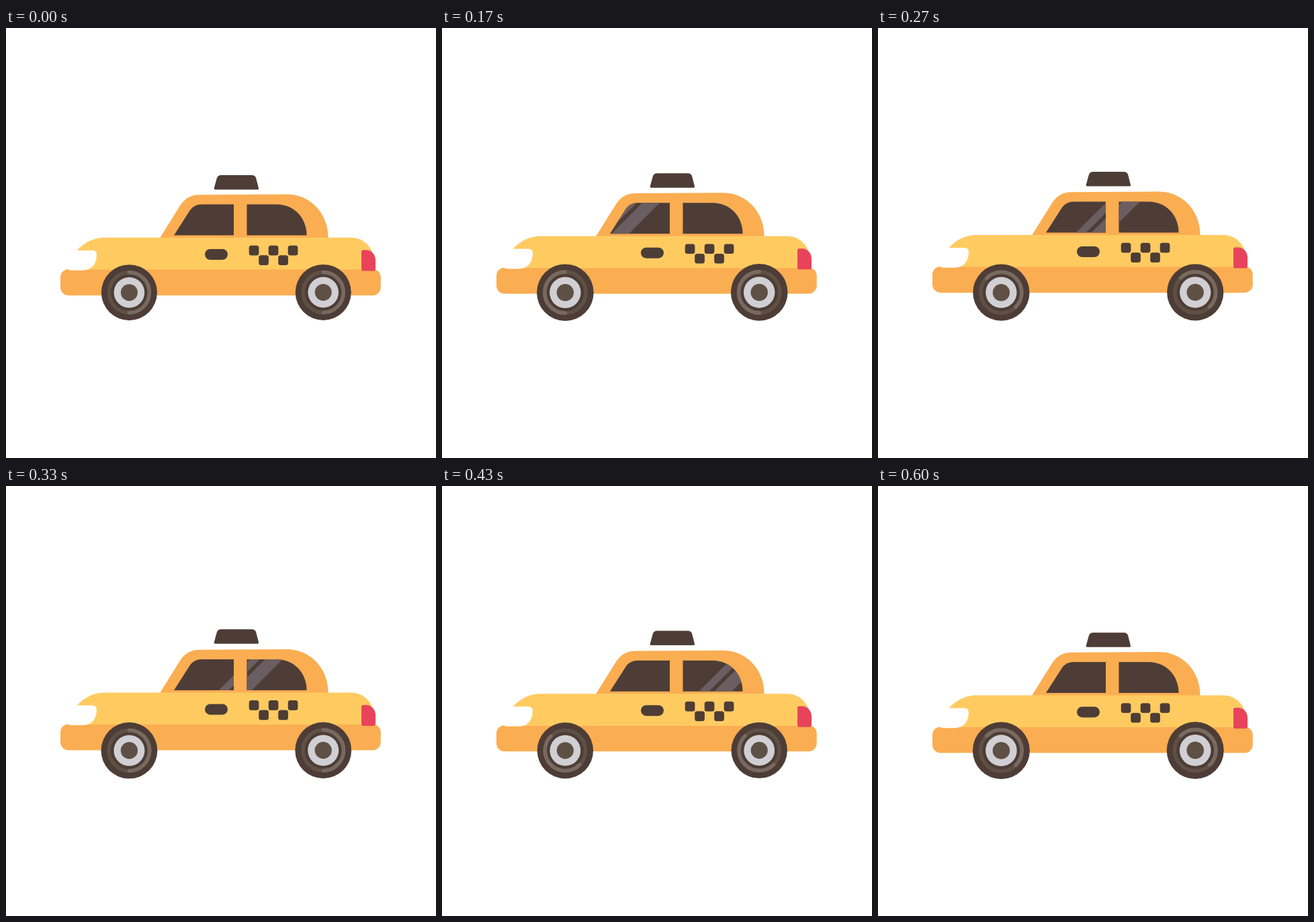
An HTML page that plays this animation: 640 px wide and 640 px high, repeating every 630 ms.

```html
<!DOCTYPE html>
<html lang="en">
<head>
<meta charset="utf-8">
<title>Taxi</title>
<style>
  html, body { margin: 0; width: 100%; height: 100%; overflow: hidden; background: #fff; }
  svg { display: block; width: 100%; height: 100%; }
  .dark { fill: #4d3d36; }
  .orange { fill: #fbad52; }
  .yellow { fill: #ffcb61; }
  .red { fill: #e8435a; }
  .white { fill: #fff; }
  .glare { fill: #6b5e62; }
  .ring { fill: none; stroke: #5f5045; stroke-width: 5.5; }
  .shine { stroke: #786a60; stroke-linecap: round; }
</style>
</head>
<body>
<svg viewBox="0 0 640 640">
  <defs>
    <clipPath id="panes">
      <path id="front" d="M250 308.5 L274 271 Q280 262.5 291 262.5 H339 V308.5 Z"/>
      <path id="rear" d="M358.5 262.5 H403 C428 262.5 447.5 282 447.5 308.5 H358.5 Z"/>
    </clipPath>
    <g id="wheel">
      <circle class="dark" r="41.5"/>
      <circle class="ring" r="30"/>
      <path id="shine" class="ring shine" d="M0 -30 A30 30 0 0 1 0 30"/>
      <circle r="22.8" fill="#d0cfd3"/>
      <circle r="12.5" fill="#5f5045"/>
    </g>
  </defs>

  <path id="sign" class="dark" d="M309.7 238.5 L313.8 223.5 Q315.3 219 320 219 H366 Q370.8 219 372.2 223.5 L376 238.5 Q376.3 240.5 374.5 240.5 H311.3 Q309.3 240.5 309.7 238.5 Z"/>

  <g id="body">
    <path class="orange" d="M229 312.5 L259 264.5 Q269 248.5 287 248.3 L418 247.5 C452 247.5 479.5 275 479.5 312.5 Z"/>
    <use href="#front" class="dark"/>
    <use href="#rear" class="dark"/>
    <g clip-path="url(#panes)">
      <g id="glare" class="glare">
        <path d="M-49 260 h15 l-50 50 h-15 Z"/>
        <path d="M-26 260 h26 l-50 50 h-26 Z"/>
      </g>
    </g>
    <rect class="orange" x="81" y="359" width="476.7" height="38.9" rx="12"/>
    <path class="yellow" d="M105 331.5 Q123 312 147 312 H513 C527 312 538 319 544 331 L548 359.5 H105 Z"/>
    <path class="white" d="M94 331 H128.5 Q135 331 135 338 Q134 360.5 113 360.7 H98 Q94 360.7 92 359 Z"/>
    <path class="red" d="M531.5 330.5 H536 C544 330.5 550 337 550 346 V358.7 Q550 361.5 547 361.5 H532 Q529 361.5 529 358.5 V333 Q529 330.5 531.5 330.5 Z"/>
    <rect class="dark" x="296" y="329" width="34" height="16" rx="8"/>
    <g id="checks" class="dark"></g>
  </g>

  <use href="#wheel" class="axle" data-x="183.4" data-y="393.7"/>
  <use href="#wheel" class="axle" data-x="472.2" data-y="393.4"/>
</svg>
<script>
  const LOOP = 630, POSES = 16;
  const BEATS = [0, 30, 70, 130, 170];  // pose starts inside each 200 ms
  const $ = id => document.getElementById(id);
  const place = (el, value) => el.setAttribute('transform', value);
  const axles = document.querySelectorAll('.axle');

  // Checker strip: alternating upper and lower squares
  $('checks').innerHTML = Array.from({ length: 5 }, (_, i) =>
    `<rect x="${361.7 + 14.5 * i}" y="${323.7 + 14.5 * (i % 2)}" width="14.7" height="14.7" rx="3.5"/>`
  ).join('');

  // Triangle wave: 0 to 1 and back over one period
  const wave = (n, period) => 1 - Math.abs(1 - 2 * (n % period) / period);

  function poseAt(t) {
    const beat = BEATS.filter(start => start <= t % 200).length - 1;
    return 5 * Math.floor(t / 200) + beat;
  }

  function draw(now) {
    const pose = poseAt(now % LOOP);
    const lift = wave(pose, POSES);
    place($('body'), `translate(0 ${-4.6 * lift})`);
    place($('sign'), `translate(0 ${-5.7 * lift})`);
    place($('glare'), `translate(${239 + 21.9 * pose} 0)`);
    place($('shine'), `rotate(${45 * pose})`);
    const size = 1 + 0.024 * wave(pose, 10);
    for (const axle of axles) {
      place(axle, `translate(${axle.dataset.x} ${axle.dataset.y}) scale(${size})`);
    }
  }

  const start = performance.now();
  function tick() {
    draw(performance.now() - start);
    requestAnimationFrame(tick);
  }
  tick();
</script>
</body>
</html>
```
